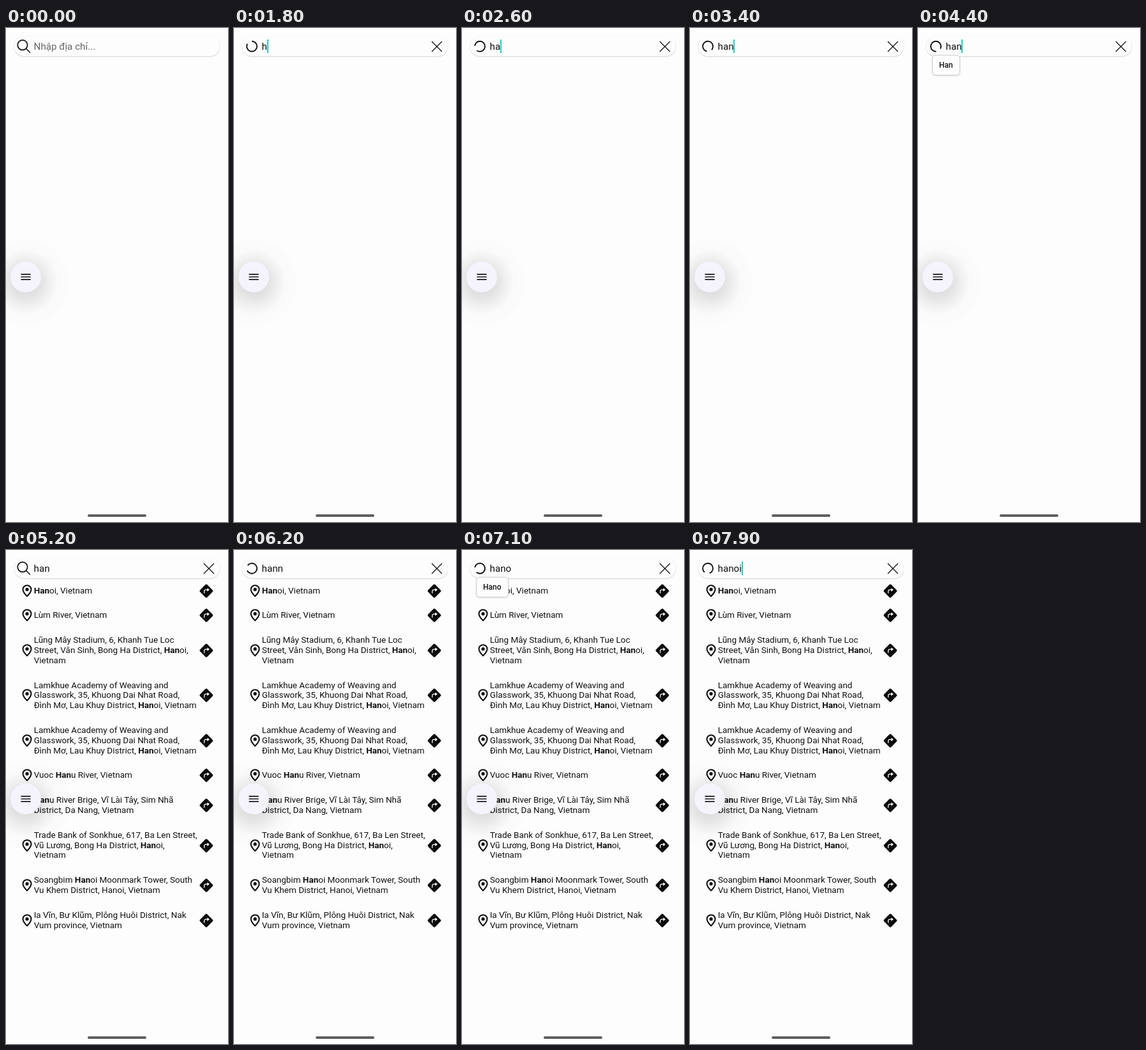
An HTML page for the animation above (8 s loop, 348x772 px).

```html
<!DOCTYPE html>
<html lang="vi">
<head>
<meta charset="utf-8">
<title>Address search</title>
<style>
  html, body { margin: 0; width: 100%; height: 100%; overflow: hidden; background: #fdfdfd; }
  body { position: relative; font-family: Roboto, "Noto Sans", sans-serif; color: #111; }
  body > *, .bar > * { position: absolute; }
  svg { overflow: visible; }
  .bar {
    left: 13px; top: 13px; width: 322px; height: 30.5px; border-radius: 15.2px;
    background: #fdfdfd; box-shadow: 0 .8px 2px rgba(0, 0, 0, .2);
  }
  .query, .hint {
    left: 30.6px; top: .5px; font-size: 15.2px; line-height: 31px; white-space: pre;
  }
  .hint { color: #666; }
  .caret { top: 4.5px; width: 1.8px; height: 21px; background: #1fcfbf; }
  .bar svg { left: 0; top: 0; width: 322px; height: 31px; fill: none; stroke: #111; }
  .list { left: 0; top: 44.2px; width: 348px; }
  .row {
    position: relative; padding: 11.5px 0 11.5px 43.7px;
    font-size: 13.515px; line-height: 15.8px; white-space: nowrap;
  }
  .row b { font-weight: 700; }
  .row svg { position: absolute; top: 50%; width: 1px; height: 1px; }
  .pin { left: 32.8px; }
  .go { left: 314px; }
  .popup {
    left: 21.5px; top: 41.5px; height: 32px; padding: 0 10.5px; box-sizing: border-box;
    border: 1px solid #cdcdcd; border-radius: 5.5px; background: #fefefe;
    font-size: 12px; font-weight: 500; line-height: 31px;
    box-shadow: 0 1px 3px rgba(0, 0, 0, .13);
  }
  .shade {
    left: -41px; top: 325px; width: 144px; height: 144px;
    background: radial-gradient(circle 72px, rgba(0, 0, 0, .115) 28%, rgba(0, 0, 0, .085) 40%,
      rgba(0, 0, 0, .055) 51%, rgba(0, 0, 0, .032) 62%, rgba(0, 0, 0, .012) 70%,
      rgba(0, 0, 0, .007) 91%, transparent 97%);
  }
  .menu { left: 6.8px; top: 364.5px; width: 48px; height: 48px; border-radius: 50%; background: #f5f4fd; }
  .menu svg { position: absolute; left: 0; top: 0; width: 48px; height: 48px; stroke: #1a1a1e; stroke-width: 1.7; }
  .home { left: 128.4px; top: 760.3px; width: 91.2px; height: 3.4px; border-radius: 2px; background: #606060; }
</style>
</head>
<body>
<svg width="0" height="0">
  <symbol id="pin" overflow="visible">
    <path d="M0 8.3C-3.6 4.6-6.5 1.4-6.5-2.3A6.5 6.5 0 0 1 6.5-2.3C6.5 1.4 3.6 4.6 0 8.3Z" fill="none" stroke="#111" stroke-width="2.1" stroke-linejoin="round"/>
    <circle cy="-2.3" r="2.6" fill="#111"/>
  </symbol>
  <symbol id="go" overflow="visible">
    <rect x="-7.96" y="-7.96" width="15.92" height="15.92" rx="1.9" transform="rotate(45)" fill="#0a0a0a"/>
    <path d="M-3.2 3.8V.6Q-3.2-1.9-.6-1.9H2" fill="none" stroke="#fff" stroke-width="1.27"/>
    <path d="M1.4-4.6L5-1.9 1.4.9Z" fill="#fff"/>
  </symbol>
</svg>

<div class="list"></div>
<div class="bar">
  <div class="hint">Nhập địa chỉ...</div>
  <div class="query"></div>
  <div class="caret"></div>
  <svg>
    <g class="lens" stroke-width="1.7"><circle cx="12.9" cy="13.6" r="7.7"/><path d="M18.3 19L24.8 25.5"/></g>
    <circle class="spinner" cx="15" cy="15.7" r="8" stroke-width="1.9" pathLength="360" stroke-dasharray="300 60"/>
    <path class="clear" d="M297 8L313 24M313 8L297 24" stroke-width="1.3"/>
  </svg>
</div>
<div class="popup"></div>
<div class="shade"></div>
<div class="menu"><svg><path d="M16.4 19.8H31.6M16.4 24H31.6M16.4 28.2H31.6"/></svg></div>
<div class="home"></div>

<script>
  const LOOP = 8000, BLINK = 500, STEP = 100;
  const craft = 'Lamkhue Academy of Weaving and<br>Glasswork, 35, Khuong Dai Nhat Road,<br>' +
    'Đình Mơ, Lau Khuy District, <b>Han</b>oi, Vietnam';
  const places = [
    '<b>Han</b>oi, Vietnam',
    'Lùm River, Vietnam',
    'Lũng Mây Stadium, 6, Khanh Tue Loc<br>Street, Vân Sinh, Bong Ha District, <b>Han</b>oi,<br>Vietnam',
    craft,
    craft,
    'Vuoc <b>Han</b>u River, Vietnam',
    '<b>Han</b>u River Brige, Vĩ Lài Tây, Sim Nhã<br>District, Da Nang, Vietnam',
    'Trade Bank of Sonkhue, 617, Ba Len Street,<br>Vũ Lương, Bong Ha District, <b>Han</b>oi,<br>Vietnam',
    'Soangbim <b>Han</b>oi Moonmark Tower, South<br>Vu Khem District, Hanoi, Vietnam',
    'Ia Vĩn, Bư Klũm, Plông Huôi District, Nak<br>Vum province, Vietnam'
  ];
  // [time, text]; the first entry sets the caret phase before typing
  const typing = [[-700, ''], [1800, 'h'], [2600, 'ha'], [3300, 'han'], [5300, 'hann'],
    [6300, 'han'], [6500, 'hano'], [7800, 'hanoi']];
  // [from, to, word]
  const hints = [[2200, 2500, 'H'], [3000, 3200, 'Ha'], [3800, 5200, 'Han'],
    [5800, 6200, 'Hann'], [6900, 7700, 'Hano']];
  // [from, to, angle of the gap, degrees per ms]
  const spins = [[1800, 4500, 330, .345], [5300, LOOP, -61, .3735]];
  const RESULTS_AT = 4500;

  const $ = s => document.querySelector(s);
  const [list, hint, query, caret, lens, spinner, clear, popup] =
    ['.list', '.hint', '.query', '.caret', '.lens', '.spinner', '.clear', '.popup'].map($);
  const show = (el, on) => { el.style.visibility = on ? 'visible' : 'hidden'; };
  const during = (spans, t) => spans.find(([from, to]) => t >= from && t < to);
  const setText = (el, s) => { if (el.textContent !== s) el.textContent = s; };

  list.innerHTML = places.map(p => `<div class="row"><svg class="pin"><use href="#pin"/></svg>${p}` +
    '<svg class="go"><use href="#go"/></svg></div>').join('');

  function draw(t) {
    const [since, text] = typing.filter(k => k[0] <= t).pop();
    setText(query, text);
    show(hint, !text);
    show(clear, text);
    show(caret, Math.floor((t - since) / BLINK) % 2 === 0);
    caret.style.left = 30.4 + query.getBoundingClientRect().width + 'px';

    const spin = during(spins, t);
    show(lens, !spin);
    show(spinner, spin);
    if (spin) {
      const [from, , gap, rate] = spin;
      const turn = gap + rate * Math.floor((t - from) / STEP) * STEP;
      // the dash starts at three o'clock, half a gap past the middle of the gap
      spinner.setAttribute('transform', `rotate(${turn + 30 - 90} 15 15.7)`);
    }

    const word = during(hints, t);
    show(popup, word);
    if (word) setText(popup, word[2]);
    show(list, t >= RESULTS_AT);
  }

  const start = performance.now();
  function tick(now) {
    draw(Math.max(0, now - start) % LOOP);
    requestAnimationFrame(tick);
  }
  draw(0);
  requestAnimationFrame(tick);
</script>
</body>
</html>
```
